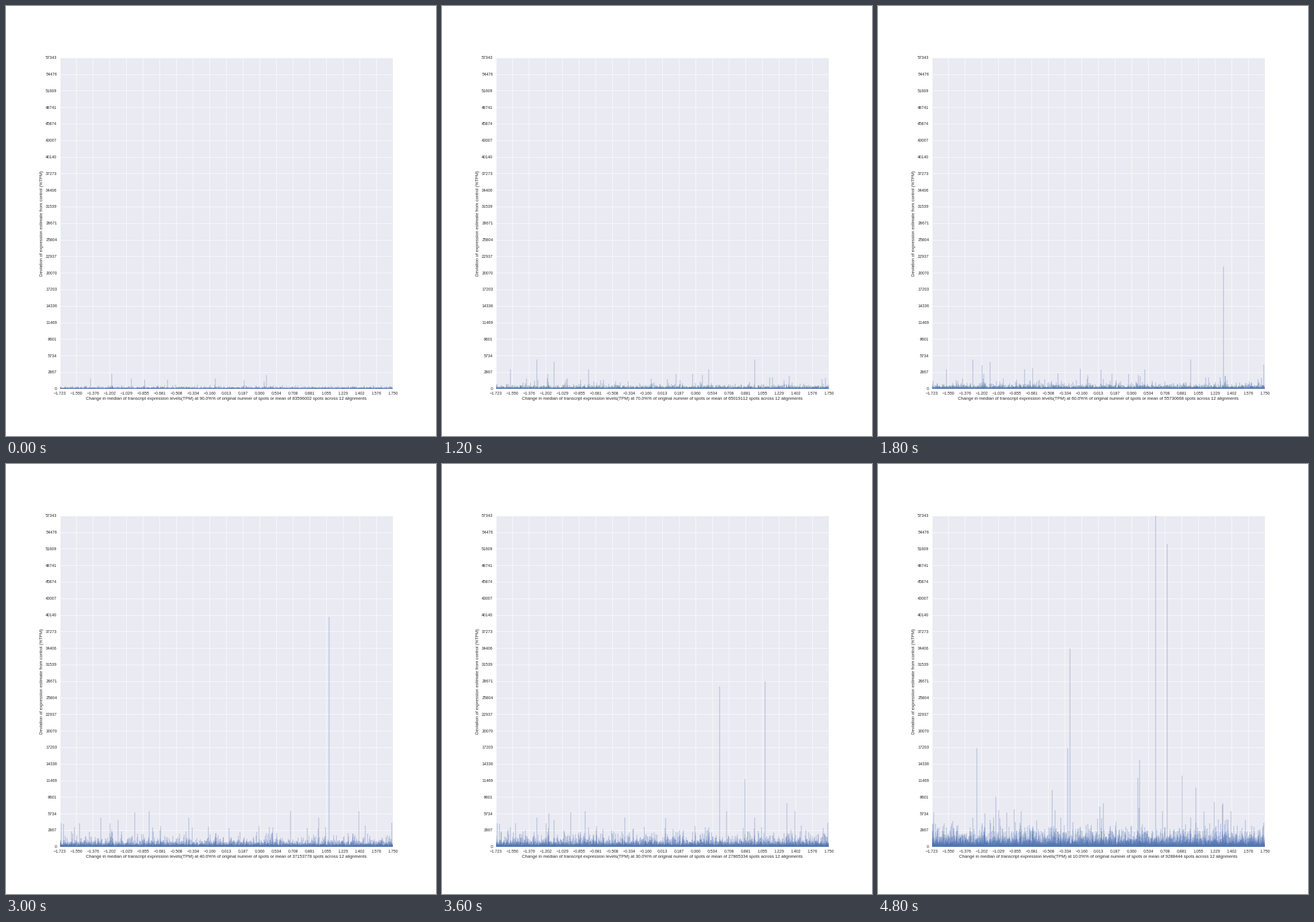
These frames come from a looping animation (748x748 px, 5.4 s). A matplotlib script:

```python
import numpy as np
import matplotlib.pyplot as plt
from matplotlib.animation import FuncAnimation
from matplotlib.collections import LineCollection

SIZE, DPI = 748, 50
STEPS = 9
X0, X_STEP, Y_MAX = -1.72333, 0.17365, 57342.9
SPOTS = 83596002 / 9
LEFT, WIDTH, HEIGHT = 0.125 * SIZE, 0.775 * SIZE, 0.77 * SIZE
BARS, OUTLIERS = 3474, 60
INK = "0.15"

# landmark bars: x -> first step, then heights in pixels; the last one is held
LANDMARKS = {
    184: (0, 26), 453: (0, 24), 165: (1, 51), 195: (2, 47), 544: (2, 51),
    601: (3, 213, 172, 0), 562: (5, 400, 288, 146, 0),
    483: (6, 279, 357, 576), 527: (6, 118, 0), 172: (7, 172), 330: (7, 172),
    452: (7, 120), 529: (7, 124), 334: (8, 345), 455: (8, 151), 503: (8, 527),
}


def crowd(step):
    """Dense bars: each keeps its own tendency and varies a little per step."""
    gene = np.random.default_rng(12).standard_normal(BARS)
    rng = np.random.default_rng(100 + step)
    z = 0.85 * gene + 0.53 * rng.standard_normal(BARS)
    h = np.exp(0.26 * step + 0.72 * z)
    cap = (7 + 5.5 * step) * rng.uniform(0.5, 1, BARS)
    x = LEFT + WIDTH * (np.arange(BARS) + 0.5) / BARS
    return x, np.minimum(h, cap)


def outliers(step):
    """Medium bars that appear at a random step and stay."""
    rng = np.random.default_rng(7)
    x = LEFT + WIDTH * rng.random(OUTLIERS)
    first = rng.integers(0, STEPS, OUTLIERS)
    h = 12 * np.exp(0.2 * first) * (1 + np.minimum(rng.exponential(0.4, OUTLIERS), 0.9))
    return x, np.where(first <= step, h, 0)


def landmarks(step):
    x = np.array(list(LANDMARKS), dtype=float)
    h = [tops[min(step - first, len(tops) - 1)] if step >= first else 0
         for first, *tops in LANDMARKS.values()]
    return x, h


def segments(step):
    px, h = np.hstack([crowd(step), outliers(step), landmarks(step)])
    px, h = px[h > 0], h[h > 0]
    ends = np.zeros((len(px), 2, 2))
    ends[:, :, 0] = (X0 + (px - LEFT) / WIDTH * 20 * X_STEP)[:, None]
    ends[:, 1, 1] = h / HEIGHT * Y_MAX
    return ends


plt.rcParams["font.family"] = "Liberation Sans"
plt.rcParams["text.kerning_factor"] = 6
fig = plt.figure(figsize=(SIZE / DPI, SIZE / DPI), dpi=DPI, facecolor="white")
ax = fig.add_axes([0.125, 0.11, 0.775, 0.77], facecolor="#EAEAF2")
ax.set_axisbelow(True)
ax.grid(color="white", linewidth=1)
for spine in ax.spines.values():
    spine.set_visible(False)

xticks = X0 + X_STEP * np.arange(21)
yticks = np.linspace(0, Y_MAX, 21)
ax.set_xticks(xticks, [f"{t:.3f}".replace("-", "\u2212") for t in xticks])
ax.set_yticks(yticks, [f"{t:.0f}" for t in yticks])
ax.set_xlim(xticks[0], xticks[-1])
ax.set_ylim(0, Y_MAX)
ax.tick_params(length=0, pad=7, labelsize=10, labelcolor=INK)
ax.set_ylabel("Deviation of expression estimate from control (%TPM)",
              fontsize=11, color=INK, labelpad=4)

bars = LineCollection([], colors="#4C72B0", linewidths=0.65, capstyle="butt", zorder=3)
bars.set_snap(True)
ax.add_collection(bars, autolim=False)


def update(step):
    tenths = STEPS - step
    bars.set_segments(segments(step))
    ax.set_xlabel(
        f"Change in median of transcript expression levels(TPM) at {tenths * 10:.1f}%% of "
        f"original numner of spots or mean of {int(SPOTS * tenths + 1e-3)} spots "
        "across 12 alignments", fontsize=11, color=INK, labelpad=4)
    return [bars]


anim = FuncAnimation(fig, update, frames=STEPS, interval=600,
                     init_func=lambda: update(0), repeat=True, repeat_delay=0)
plt.show()
```
